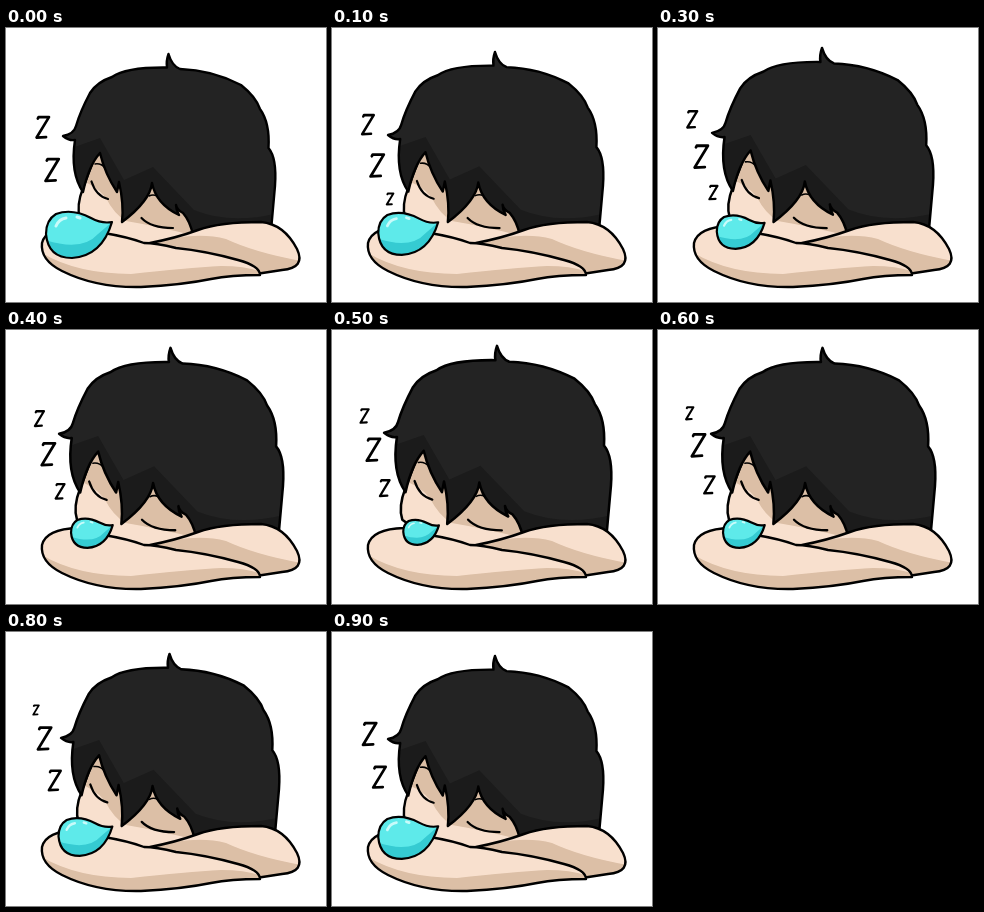
These frames come from a looping animation (320 px wide and 274 px high, 1000 ms). An HTML page with a canvas:

```html
<!DOCTYPE html>
<html lang="en">
<head>
<meta charset="utf-8">
<title>Sleeping</title>
<style>
html, body { margin: 0; height: 100%; overflow: hidden; background: #fff; }
canvas { display: block; width: 100%; height: 100%; }
</style>
</head>
<body>
<canvas width="320" height="274"></canvas>
<script>
const ctx = document.querySelector("canvas").getContext("2d");
const skin = "#f8e0ce", skinShade = "#dcbfa6";

const shape = (fill, outline, shadeFill, shade) =>
  ({ fill, shadeFill, outline: new Path2D(outline), shade: new Path2D(shade) });

const face = shape(skin, "M77 160Q70 178 74 190L110 216H195V150L94 115Z",
  skinShade, "M70 152Q88 155 100 170 108 186 120 193 150 198 190 208V110H70Z");

const hair = shape("#232323",
  "M57 108Q68 106 70 98 74 84 84 65 91 54 106 49 120 39 161 39.5 160 33 162.5 26" +
  "Q166 38 174 41 206 42 235 57 250 69 254 81 264 95 262.5 120 271 130 269 158" +
  "L265 203 187 207Q184 193 177 185 171 182 170 177 170 182 173 187" +
  "Q150 176 146 155 144 173 116 194 118 176 113 154L111 164Q99 146 94 125" +
  "Q83 137 77 164 64 145 69 112 63 113 57 108Z",
  "#1b1b1b", "M60 122L94 110 118 152 147 139 188 182Q225 197 272 185V220H60Z");

const farArm = shape(skin,
  "M144 215Q170 210 192 202 214 194 255 194 278 196 291 221 300 240 276 242L250 246Z",
  skinShade, "M144 215Q190 203 220 211 250 225 296 233V250H144Z");

const nearArm = shape(skin,
  "M72 198Q40 199 36 215 34 232 56 243 90 260 135 259 176 257 205 251 225 247 254 247" +
  "Q254 238 232 232 200 223 170 220 150 215 138 215 122 209 98 205 85 197 72 198Z",
  skinShade, "M34 224Q70 246 125 246 180 240 215 238 240 238 256 244V262H34Z");

const bubble = shape("#5eeaea",
  "M106 194Q96 196 85 190 66 180 50 186 40 192 40 206 42 230 66 230 96 228 106 194Z",
  "#35cbd2", "M106 194L92 206Q76 224 39 212V235H106Z");

const lids = new Path2D("M85.5 153.5Q90 168 102 171M135.5 190Q145 200 167 200");
const brows = new Path2D("M89 136Q95 135 99 140M143 168Q147 166 151 168");
const shine = new Path2D("M50 198Q53 191 60 190M71 189L74 190");
const zed = new Path2D("M-.2 -.36L-.17 -.42H.26L-.25 .42 .14 .4");

// Points on the path of a rising Z, nine steps apart: x, y, height
const rise = [[58, 171, 13], [46, 142, 26], [37.5, 102, 26], [30, 78, 11]];

function line(path, width, color = "#000") {
  ctx.lineWidth = width;
  ctx.strokeStyle = color;
  ctx.stroke(path);
}

function paint(s, width = 2.4) {
  ctx.fillStyle = s.fill;
  ctx.fill(s.outline);
  ctx.save();
  ctx.clip(s.outline);
  ctx.fillStyle = s.shadeFill;
  ctx.fill(s.shade);
  ctx.restore();
  line(s.outline, width);
}

function scaled(x, y, sx, sy, body) {
  ctx.save();
  ctx.translate(x, y);
  ctx.scale(sx, sy);
  ctx.translate(-x, -y);
  body();
  ctx.restore();
}

function drawZ(age) {
  if (age > 27) return;
  const i = Math.min(2, Math.floor(age / 9)), u = age / 9 - i;
  const [x, y, h] = rise[i].map((v, j) => v + (rise[i + 1][j] - v) * u);
  ctx.save();
  ctx.translate(x, y);
  ctx.scale(h, h);
  line(zed, (1.2 + h * .06) / h);
  ctx.restore();
}

function draw(now) {
  const step = Math.floor(now / 100) % 10;
  const breath = 5 - Math.abs(step - 5);
  const size = 1 - breath * .092;

  ctx.clearRect(0, 0, 320, 274);
  ctx.lineCap = ctx.lineJoin = "round";
  scaled(127, 195, 1 + breath * .014, 1 + breath * .012, () => {
    paint(face);
    line(lids, 2.2);
    line(brows, 1.5);
    paint(hair);
  });
  paint(farArm);
  paint(nearArm);
  scaled(108, 197, size, size, () => {
    paint(bubble, 2.2 / size);
    line(shine, 3, "#c9fbfa");
  });
  for (let i = 0; i < 3; i++) drawZ((step + 9) % 10 + i * 10);
  requestAnimationFrame(draw);
}
requestAnimationFrame(draw);
</script>
</body>
</html>
```
